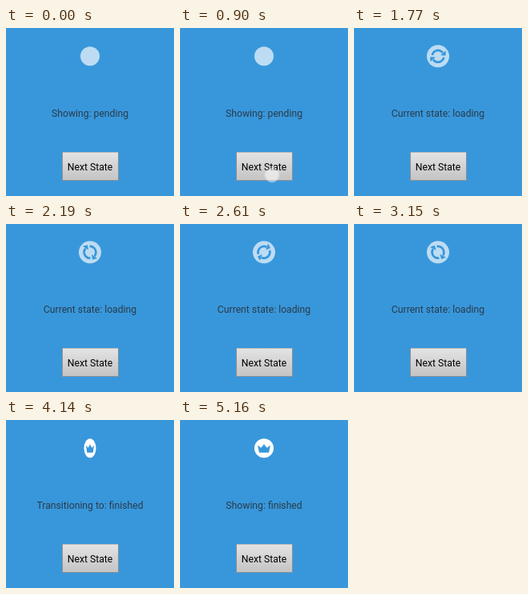
An HTML page with a canvas for the animation above (5190 ms loop, 210 by 210 pixels).

```html
<!DOCTYPE html>
<html lang="en">
<head>
<meta charset="utf-8">
<style>
html, body { margin: 0; width: 100%; height: 100%; overflow: hidden; background: #3897db; }
canvas { display: block; width: 210px; height: 210px; }
</style>
</head>
<body>
<canvas id="stage" width="210" height="210"></canvas>
<script>
const ctx = document.getElementById('stage').getContext('2d');
const LOOP = 5190, FLIP = 600, SPIN = 2000;
const BLUE = '#3897db', PALE = '#bddcf3';
const steps = [
  { press: 870, start: 982, from: 'pending', to: 'loading', label: 'Current state: loading' },
  { press: 3520, start: 3712, from: 'loading', to: 'finished', label: 'Showing: finished' }
];

function disc(radius, color) {
  ctx.fillStyle = color;
  ctx.beginPath();
  ctx.arc(0, 0, radius, 0, 2 * Math.PI);
  ctx.fill();
}

function polygon(points, color) {
  ctx.fillStyle = color;
  ctx.beginPath();
  points.forEach(([x, y]) => ctx.lineTo(x, y));
  ctx.fill();
}

const icons = {
  pending() {
    disc(12, PALE);
  },
  loading(t) {
    disc(14, PALE);
    ctx.rotate((t - 1770) / SPIN * 2 * Math.PI);
    ctx.strokeStyle = BLUE;
    ctx.lineWidth = 2.8;
    for (let i = 0; i < 2; i++) {
      ctx.beginPath();
      ctx.arc(0, 0, 7.4, Math.PI * 1.06, Math.PI * 1.8);
      ctx.stroke();
      polygon([[9.6, -7], [9.6, -0.8], [3.2, -1.2]], BLUE);
      ctx.rotate(Math.PI);
    }
  },
  finished() {
    disc(12, '#fff');
    polygon([[-8, -3.5], [-3.6, -0.5], [0, -5], [3.6, -0.5], [8, -3.5], [6, 5.5], [-6, 5.5]], BLUE);
  }
};

function text(value, y, color) {
  ctx.font = '12.2px Roboto, sans-serif';
  ctx.textAlign = 'center';
  ctx.fillStyle = color;
  ctx.fillText(value, 105, y);
}

function drawButton() {
  const shade = ctx.createLinearGradient(0, 155, 0, 191);
  shade.addColorStop(0, '#e4e4e4');
  shade.addColorStop(1, '#c3c3c3');
  ctx.fillStyle = '#8b9298';
  ctx.fillRect(70, 155, 71, 36);
  ctx.fillStyle = shade;
  ctx.fillRect(71, 155.5, 69, 34.5);
  text('Next State', 178, '#000');
}

function drawTouch(t) {
  if (!steps.some(s => t >= s.press && t < s.start)) return;
  ctx.save();
  ctx.translate(115, 184);
  disc(9.3, 'rgba(255,255,255,.4)');
  disc(7.5, 'rgba(255,255,255,.25)');
  ctx.restore();
}

function stateAt(t) {
  let state = { icon: 'pending', label: 'Showing: pending', width: 1 };
  for (const { start, from, to, label } of steps) {
    const p = (t - start) / FLIP;
    if (p >= 1) state = { icon: to, label, width: 1 };
    else if (p >= 0) state = {
      icon: p < 0.5 ? from : to,
      label: 'Transitioning to: ' + to,
      width: Math.abs(Math.cos(p * Math.PI))
    };
  }
  return state;
}

function draw(t) {
  const { icon, label, width } = stateAt(t);
  ctx.fillStyle = BLUE;
  ctx.fillRect(0, 0, 210, 210);
  ctx.save();
  ctx.translate(105, 35.3);
  ctx.scale(Math.max(width, 0.01), 1);
  icons[icon](t);
  ctx.restore();
  text(label, 111, '#293b4a');
  drawButton();
  drawTouch(t);
}

const begin = performance.now();
function tick() {
  draw((performance.now() - begin) % LOOP);
  requestAnimationFrame(tick);
}
tick();
</script>
</body>
</html>
```
